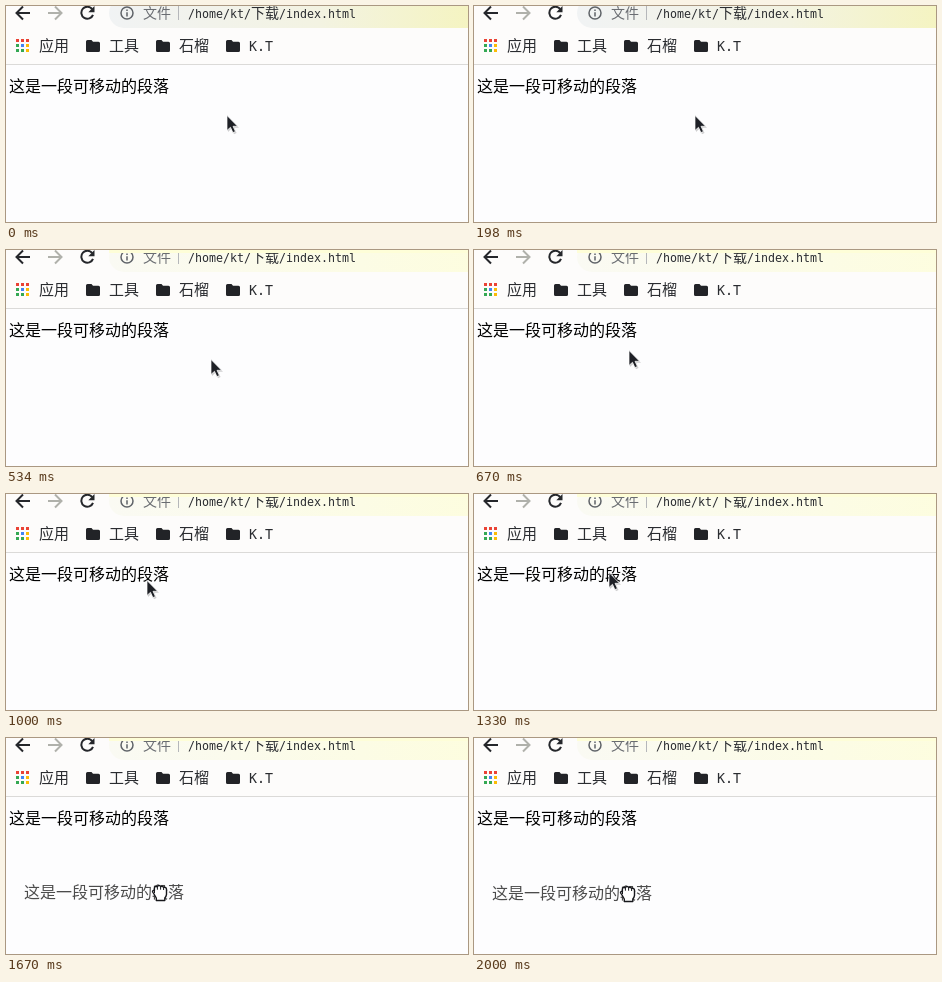
An HTML page for the animation above (2.33 s loop, 462 px wide and 216 px high).

```html
<!DOCTYPE html>
<html lang="zh-CN">
<head>
<meta charset="utf-8">
<title>可移动的段落</title>
<style>
html, body { margin: 0; width: 100%; height: 100%; overflow: hidden; background: #fdfdfe; }
svg { display: block; width: 462px; height: 216px; }
text { white-space: pre; }
.page { font: 16px "Noto Sans CJK SC", "Noto Sans CJK", sans-serif; }
.bar { font: 15px "Noto Sans CJK SC", "Noto Sans CJK", sans-serif; fill: #2a2c30; }
.url { font-size: 14px; }
.mono { font-family: "DejaVu Sans Mono", monospace; font-size: 13.3px; }
.url .mono { font-size: 11.63px; }
</style>
</head>
<body>
<svg viewBox="0 0 462 216">
  <defs>
    <linearGradient id="tint">
      <stop offset="0" stop-color="#f1f3f4"/>
      <stop offset=".55" stop-color="#f3f3e2"/>
      <stop offset="1" stop-color="#f5f4bd"/>
    </linearGradient>
    <linearGradient id="pale">
      <stop offset="0" stop-color="#fafaf3"/>
      <stop offset="1" stop-color="#fdfdde"/>
    </linearGradient>
    <path id="folder" d="M1.5 0H5.5L7 1.8H12.5Q14 1.8 14 3.3V10.5Q14 12 12.5 12H1.5Q0 12 0 10.5V1.5Q0 0 1.5 0Z" fill="#222327"/>
  </defs>
  <rect width="462" height="216" fill="#fdfdfe"/>
  <rect width="462" height="58" fill="#fdfcfb"/>
  <rect id="pill" x="103" y="-8" width="380" height="30" rx="15"/>
  <path d="M0 58.5H462" stroke="#dbdad8"/>

  <g fill="none" stroke="#25272b" stroke-width="2">
    <path d="M24 7H11M17 .5L10.5 7L17 13.5"/>
    <path d="M42 7H55M49 .5L55.5 7L49 13.5" stroke="#b0b1ab"/>
    <path d="M86.2 3.2A6 6 0 1 0 87 8.8"/>
  </g>
  <path d="M88.5 0V6.2H82.3Z" fill="#25272b"/>
  <g stroke="#5f6368" stroke-width="1.5" fill="none">
    <circle cx="121" cy="7" r="6"/>
    <path d="M121 6.2V10.5M121 3.5V5"/>
  </g>
  <text class="bar url" x="137" y="12" style="fill:#6a6d72">文件</text>
  <path d="M172.5 0V14" stroke="#b5b7ba"/>
  <text class="bar url" x="182" y="12"><tspan class="mono">/home/kt/</tspan>下载<tspan class="mono">/index.html</tspan></text>
  <rect id="haze" x="103" width="359" height="3" fill="#fefed8"/>

  <g id="apps"></g>
  <g id="marks"></g>

  <text class="page" x="3" y="86">这是一段可移动的段落</text>
  <g id="drag">
    <text class="page" x="18" y="160" fill="#4c4c4c">这是一段可移动的段落</text>
    <path d="M147.7 155.5Q145.4 153.2 147.5 152.4L148.4 152.6V150Q148.6 148.2 150.4 148.4L151.2 148.8Q152 147 153.8 147.6L154.7 148.6Q156.4 147.6 157.6 149.3Q160.4 148.8 160.5 151.3V156.3Q160.2 158.5 158.8 160V162.5H150.3V160Z" fill="#fff" stroke="#17181c" stroke-width="1.4" stroke-linejoin="round"/>
    <path d="M151.4 149V151.7M154.6 149V151.7M157.6 149.5V152M148.5 152.5V155" stroke="#17181c" fill="none"/>
  </g>
  <g id="arrow">
    <path d="M1 1V16L4.5 12.8L7 18.2L9.6 17L7.2 11.8H12Z" fill="#000" opacity=".18"/>
    <path d="M0 -.5V14.4L3.5 11.3L5.9 16.6L8.4 15.5L6 10.3H10.6Z" fill="#1e2026" stroke="#fff" stroke-width=".7"/>
  </g>
</svg>
<script>
const $ = id => document.getElementById(id);
const red = '#ea4335', green = '#34a853', blue = '#4285f4', amber = '#fbbc05';

$('apps').innerHTML = [red, red, red, green, blue, amber, green, green, amber]
  .map((c, i) => `<rect x="${10 + i % 3 * 5}" y="${33 + Math.floor(i / 3) * 5}" width="3" height="3" fill="${c}"/>`)
  .join('');

$('marks').innerHTML = ['应用', '工具', '石榴', 'K.T'].map((name, i) =>
  (i ? `<use href="#folder" x="${10 + 70 * i}" y="34"/>` : '') +
  `<text class="bar${/[A-Z]/.test(name) ? ' mono' : ''}" x="${33 + 70 * i}" y="45">${name}</text>`).join('');

const LOOP = 2330;
const starts = [0, 330, 670, 1000, 1330, 1670, 2000];
const tips = [[221, 110], [205, 110], [155, 101], [141, 87], [135, 79]];

const show = (id, on) => $(id).setAttribute('display', on ? 'inline' : 'none');

function draw(t) {
  const step = starts.filter(s => s <= t).length - 1;
  const tip = tips[step];
  show('arrow', tip);
  show('drag', !tip);
  if (tip) $('arrow').setAttribute('transform', `translate(${tip})`);
  else $('drag').setAttribute('transform', `translate(0 ${step - tips.length})`);
  $('pill').setAttribute('fill', step ? 'url(#pale)' : 'url(#tint)');
  show('haze', step);
}

const begin = performance.now();
function tick() {
  draw((performance.now() - begin) % LOOP);
  requestAnimationFrame(tick);
}
tick();
</script>
</body>
</html>
```
